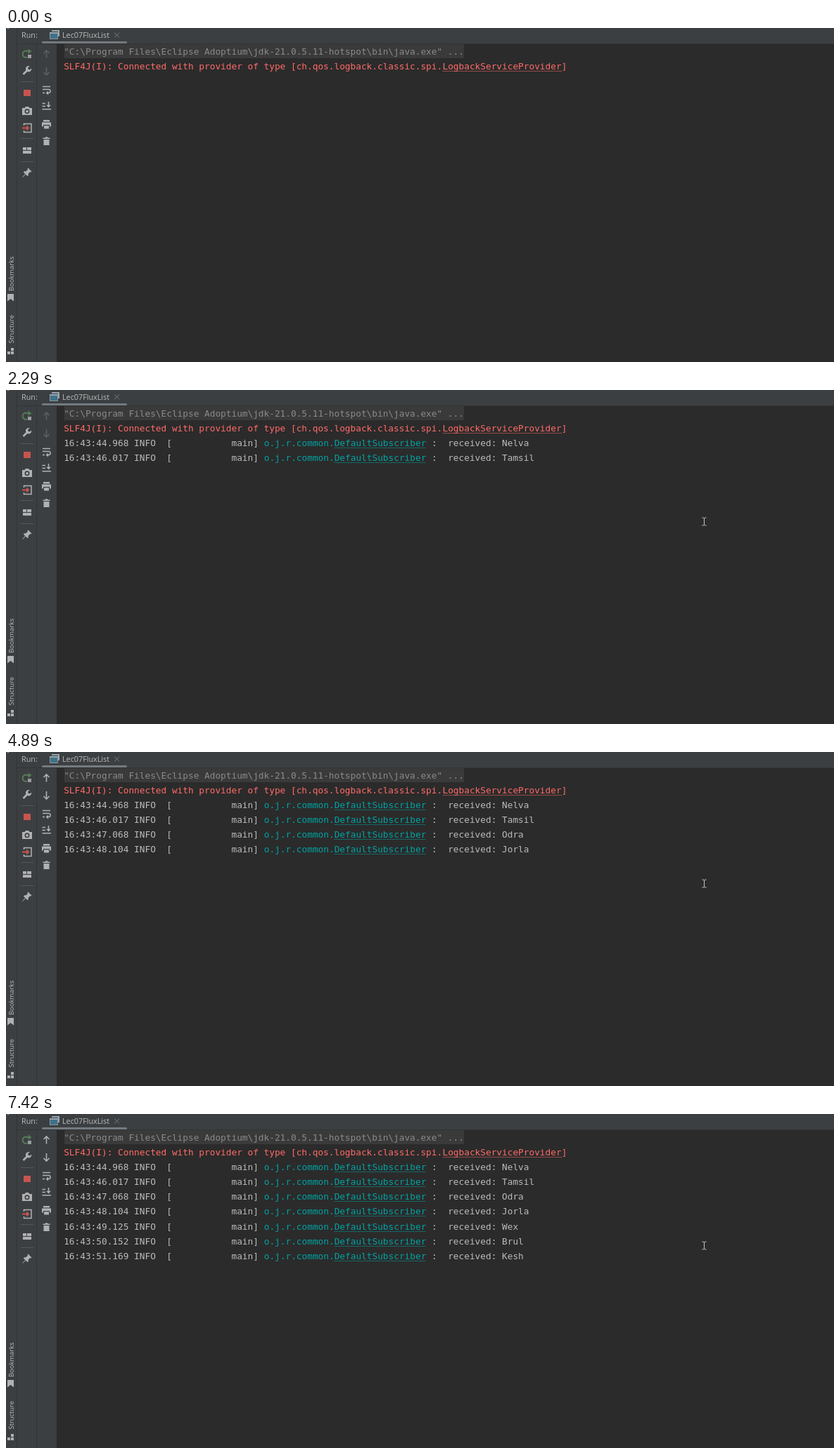
Write an HTML page that moves like this. It is 1177 px wide and 476 px high and loops after 8 s.

```html
<!DOCTYPE html>
<html lang="en">
<head>
<meta charset="utf-8">
<title>Run console</title>
<style>
  html, body { margin: 0; width: 100%; height: 100%; overflow: hidden; background: #2b2b2b; }
  svg { display: block; }
  text { white-space: pre; }
  #console { font: 12.77px "DejaVu Sans Mono", monospace; fill: #bbbbbb; }
  .ui { font: 10.8px "Open Sans", sans-serif; fill: #bbbbbb; }
  .side { font-size: 9.4px; }
  .link { stroke-dasharray: 1 1; }
  .icon { fill: #afb1b3; }
  .line { fill: none; stroke: #afb1b3; stroke-width: 1.5; }
</style>
</head>
<body>
<svg width="1177" height="476" viewBox="0 0 1177 476">
  <path fill="#3c3f41" d="M0 0H1177V22H72V476H0Z"/>
  <path fill="none" stroke="#323435" d="M15.5 0V476M43.5 22V476M16 22.5H1177"/>
  <path fill="none" stroke="#555759" d="M21 76.5H39M21 157.5H39M21 190.5H39"/>
  <path class="icon" d="M2 0H4V1H2Z"/>

  <!-- tab header -->
  <text class="ui" x="22" y="14">Run:</text>
  <text class="ui" x="80" y="14">Lec07FluxList</text>
  <rect x="51" y="19" width="121" height="3" rx="1.5" fill="#747a80"/>
  <path fill="#9aa7b0" d="M65 3H76V12H74V5H65Z"/>
  <rect x="62.5" y="6.5" width="11" height="9" fill="#3f7189" stroke="#8796a0"/>
  <path fill="#9aa7b0" d="M62 6H74V8H62Z"/>
  <path fill="none" stroke="#777b7e" d="M154 6.5L161 13.5M161 6.5L154 13.5"/>

  <!-- left stripe -->
  <text class="ui side" transform="translate(11 375) rotate(-90)">Bookmarks</text>
  <text class="ui side" transform="translate(11 449.5) rotate(-90)">Structure</text>
  <path class="icon" d="M2 379H11V389.5L6.5 386L2 389.5Z"/>
  <path class="icon" d="M7 456H11V460H7ZM2 461H6V465H2ZM7 461H11V465H7Z"/>

  <!-- run toolbar -->
  <path fill="none" stroke="#557a57" stroke-width="2" d="M30 41.5A4.6 4.6 0 1 1 30 33H33"/>
  <path fill="#557a57" d="M31.5 29.5L36.5 33.2L31.5 37Z"/>
  <rect x="31" y="38" width="5" height="5" fill="#9a9d9f"/>
  <path fill="none" stroke="#afb1b3" stroke-width="2.6" d="M24.5 66L31 59.5"/>
  <path class="icon" d="M33.8 54.4A4.2 4.2 0 1 0 36.2 57.4L33.8 59.4L31.4 58.6L31 56.4Z"/>
  <rect x="25" y="88" width="10" height="9" fill="#c75450"/>
  <path class="icon" fill-rule="evenodd" d="M23 114H26.5L28 112H32L33.5 114H37V124H23ZM30 115.3A3.5 3.5 0 1 0 30 122.3A3.5 3.5 0 1 0 30 115.3Z"/>
  <circle cx="30" cy="118.8" r="1.9" class="icon"/>
  <path class="line" d="M25.5 139V136.5H36V148.5H25.5V146"/>
  <path fill="#c75450" d="M23 141.5H29V138.5L33.5 142.5L29 146.5V143.5H23Z"/>
  <path class="icon" d="M24 170H29V174H24ZM30 170H36V174H30ZM24 175H36V179H24Z"/>
  <path class="icon" d="M31.5 199.5L36.5 204.5L35.3 205.5L34.3 205L31.7 207.7L31.8 210L30.5 211.2L28 208.6L23.7 212.8L23.2 212.3L27.3 208L24.8 205.5L26 204.2L28.3 204.3L31 201.7L30.4 200.6Z"/>

  <!-- output toolbar -->
  <path id="arrows" fill="none" stroke-width="1.6" d="M57.5 42.5V32M53.5 36L57.5 32L61.5 36M57.5 56V67M53.5 63L57.5 67L61.5 63"/>
  <path class="line" d="M52 83.5H63M52 87.5H61A2.6 2.6 0 0 1 61 92.6H58M52 92.5H55"/>
  <path class="icon" d="M60 89.8V95.4L56.5 92.6Z"/>
  <path class="line" d="M51.5 115.8H64M51.5 107.5H56M51.5 111.5H56M60.5 105V112"/>
  <path class="icon" d="M57.2 109.8H63.8L60.5 113.6Z"/>
  <path class="icon" d="M53 131H62V133.5H53ZM51 134.5H64V140.5H62V138H53V140.5H51ZM54 139.2H61V143.5H54Z"/>
  <path class="icon" d="M52.5 156.5H55.5L56.3 155.2H58.8L59.6 156.5H62.5V158H52.5ZM53.5 159H61.5V167H53.5Z"/>

  <rect x="83" y="23" width="568" height="20" fill="#3a3a3a"/>
  <g id="console"></g>
  <path id="cursor" fill="none" stroke="#c8c8c8" d="M-3 -5.5H-1L0 -4.5L1 -5.5H3M0 -4.5V4.5M-3 5.5H-1L0 4.5L1 5.5H3"/>
</svg>
<script>
const LOOP = 8000, LEFT = 82.2, CHAR = 7.69;
const log = [
  [1230, "44.968", "Nelva"],
  [2290, "46.017", "Tamsil"],
  [3300, "47.068", "Odra"],
  [4360, "48.104", "Jorla"],
  [5360, "49.125", "Wex"],
  [6360, "50.152", "Brul"],
  [7420, "51.169", "Kesh"]
];
const $ = id => document.getElementById(id);

function add(parent, tag, attrs, content = "") {
  const el = document.createElementNS("http://www.w3.org/2000/svg", tag);
  for (const key in attrs) el.setAttribute(key, attrs[key]);
  el.textContent = content;
  return parent.appendChild(el);
}

// Each part is [text, colour, underlined].
function addRow(index, parts) {
  const row = add($("console"), "g", {});
  const y = Math.round(37.6 + 21.15 * index);
  let column = 0;
  for (const [text, fill, underlined] of parts) {
    const x = LEFT + column * CHAR;
    column += text.length;
    add(row, "text", { x, y, fill }, text);
    if (underlined) {
      add(row, "path", { class: "link", stroke: fill, d: `M${Math.round(x)} ${y + 2.5}H${Math.round(LEFT + column * CHAR)}` });
    }
  }
  return row;
}

const red = "#ff6b68", teal = "#00a3a3", grey = "#bbbbbb";
addRow(0, [['"C:\\Program Files\\Eclipse Adoptium\\jdk-21.0.5.11-hotspot\\bin\\java.exe" ...', "#8a8a8a"]]);
addRow(1, [
  ["SLF4J(I): Connected with provider of type [ch.qos.logback.classic.spi.", red],
  ["LogbackServiceProvider", red, true],
  ["]", red]
]);
const rows = log.map(([, seconds, name], i) => addRow(i + 2, [
  [`16:43:${seconds} INFO  [${"main".padStart(15)}] `, grey],
  ["o.j.r.common.", teal],
  ["DefaultSubscriber", teal, true],
  [` :  received: ${name}`, grey]
]));

const show = (el, on) => el.setAttribute("visibility", on ? "visible" : "hidden");

function draw(now) {
  const t = now % LOOP;
  rows.forEach((row, i) => show(row, t >= log[i][0]));
  $("arrows").setAttribute("stroke", t >= 4890 ? "#afb1b3" : "#5c5f61");

  // The pointer glides in with ten discrete moves.
  const step = Math.min(10, Math.max(0, Math.floor((t - 200) / 76))) / 10;
  const ease = step * (2 - step);
  const x = Math.round(1089 - 97 * ease) + 0.5, y = Math.round(433 - 246 * ease) + 0.5;
  $("cursor").setAttribute("transform", `translate(${x} ${y})`);
  show($("cursor"), t >= 200);
  requestAnimationFrame(draw);
}
requestAnimationFrame(draw);
</script>
</body>
</html>
```
